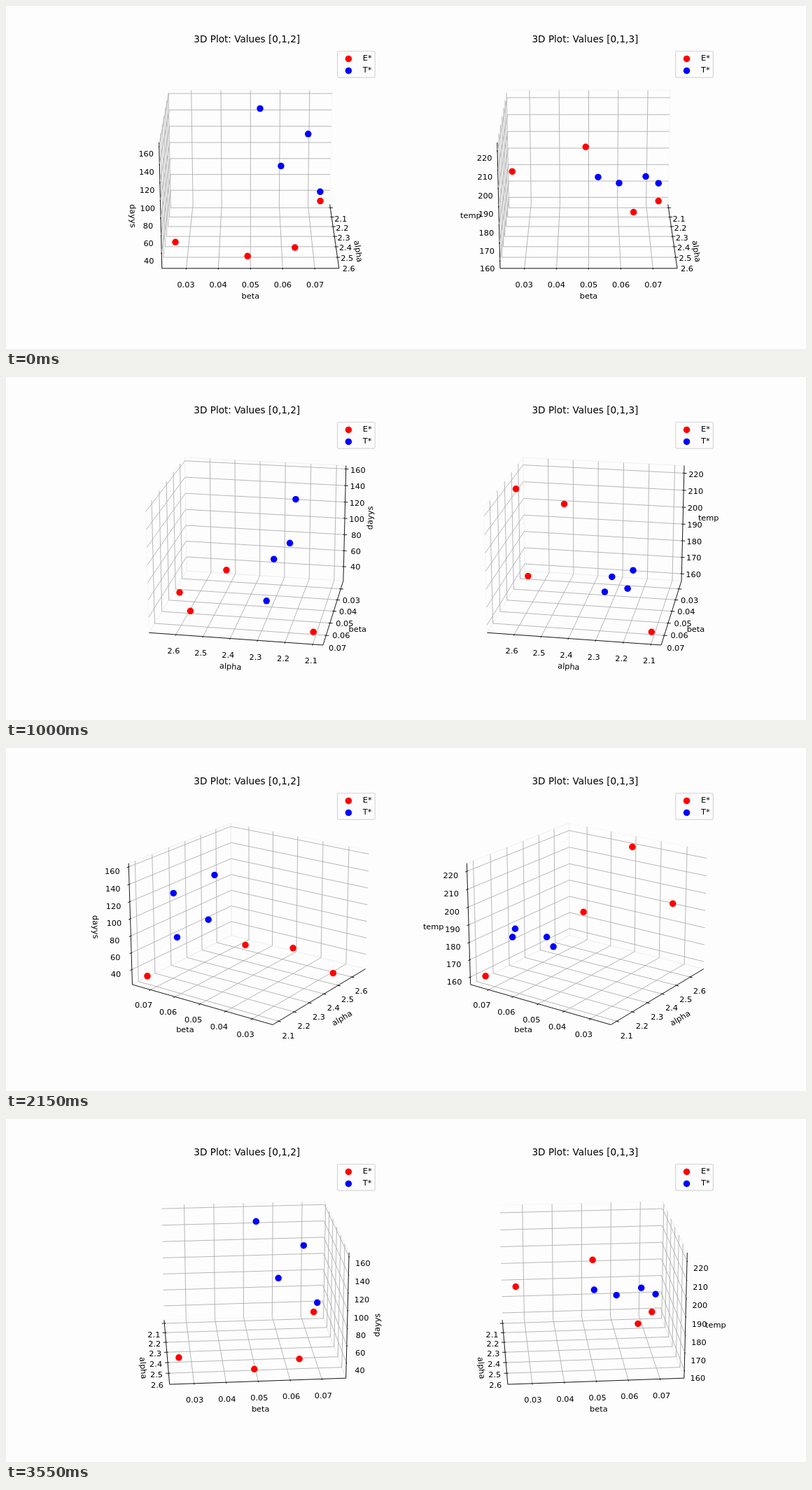
These frames come from a looping animation (1143x490 px, 3.6 s). An HTML page with a canvas:

```html
<!DOCTYPE html>
<html lang="en">
<head>
<meta charset="utf-8">
<title>Rotating 3D scatter plots</title>
<style>
  html, body { margin: 0; width: 100%; height: 100%; overflow: hidden; background: #fdfdfd; }
  canvas { display: block; width: 1143px; height: 490px; }
</style>
</head>
<body>
<canvas id="stage" width="1143" height="490"></canvas>
<script>
const ctx = document.getElementById('stage').getContext('2d');

const STEP_MS = 50, STEPS = 72, STEP_DEG = 360 / STEPS;
const ELEV = 20 * Math.PI / 180, DIST = 10;
const PT = 81.65 / 72;              // pixels per point
const FONT = 10 * PT;
const SIDE = 377.3, TOP = 58.8;     // square drawing area of each plot
const SCALE = SIDE / 0.185;
const SHIFT = SIDE * 0.0025 / 0.185;
const BOX = [8 / 7, 8 / 7, 6 / 7];  // box size in view units
const DELTA = 1 / 12;
const EDGE = 0.5 + DELTA / 4;
const PER_POINT = 48 / (2 * SIDE / PT) * DELTA;
const LABEL_GAP = 25 * PER_POINT, TICK_GAP = 11.5 * PER_POINT;
const PANE = ['rgba(242,242,242,.5)', 'rgba(229,229,229,.5)', 'rgba(236,236,236,.5)'];

const series = [
  { name: 'E*', color: '#f00', rows: [   // alpha, beta, dayys, temp
    [2.5287, 0.02593, 31, 200],
    [2.6601, 0.0491, 31, 220],
    [2.58, 0.06413, 31, 180],
    [2.1039, 0.07407, 31, 160]] },
  { name: 'T*', color: '#00f', rows: [
    [2.2075, 0.05317, 155, 180],
    [2.2005, 0.0692, 124, 180],
    [2.2744, 0.0601, 93, 180],
    [2.2763, 0.0732, 62, 180]] }
];

const axis = (label, lo, hi, first, step, count, digits) => ({
  label, lo, hi, digits,
  ticks: Array.from({ length: count }, (_, i) => first + i * step)
});
const alpha = axis('alpha', 2.0761, 2.6879, 2.1, 0.1, 6, 1);
const beta = axis('beta', 0.02352, 0.07648, 0.03, 0.01, 5, 2);
const plots = [
  { mid: 344.2, title: '3D Plot: Values [0,1,2]', column: 2,
    axes: [alpha, beta, axis('dayys', 24.8, 161.2, 40, 20, 7, 0)] },
  { mid: 827.4, title: '3D Plot: Values [0,1,3]', column: 3,
    axes: [alpha, beta, axis('temp', 157, 223, 160, 10, 7, 0)] }
];

const unit = (ax, v) => (v - ax.lo) / (ax.hi - ax.lo) - 0.5;
const put = (p, i, v) => p.map((old, k) => k === i ? v : old);
const pushOut = (p, skip, d) => p.map((v, k) => k === skip ? v : v + (v < 0 ? -d : d));

function projector(mid, azim) {
  const ca = Math.cos(azim), sa = Math.sin(azim);
  const ce = Math.cos(ELEV), se = Math.sin(ELEV);
  return p => {
    const [x, y, z] = p.map((v, i) => v * BOX[i]);
    const near = x * ca + y * sa;
    const k = SCALE / (DIST - near * ce - z * se);
    return [mid + SHIFT + (y * ca - x * sa) * k,
            TOP + SIDE / 2 - SHIFT - (z * ce - near * se) * k];
  };
}

function polyline(points, color, width) {
  ctx.beginPath();
  points.forEach(([x, y]) => ctx.lineTo(x, y));
  ctx.strokeStyle = color;
  ctx.lineWidth = width * PT;
  ctx.stroke();
}

function text(str, x, y, align = 'center', size = FONT) {
  ctx.font = `${size}px "DejaVu Sans", sans-serif`;
  ctx.textAlign = align;
  ctx.fillStyle = '#000';
  ctx.fillText(str, x, y);
}

function dot(x, y, color) {
  ctx.beginPath();
  ctx.arc(x, y, 4.75, 0, 2 * Math.PI);
  ctx.fillStyle = color;
  ctx.fill();
}

function drawPane(i, far, proj) {
  const [a, b] = [[1, 2], [0, 2], [0, 1]][i];
  const corners = [[-EDGE, -EDGE], [EDGE, -EDGE], [EDGE, EDGE], [-EDGE, EDGE]];
  polyline(corners.map(([u, v]) => proj(put(put(far, a, u), b, v))), PANE[i], 1);
}

function drawAxis(ax, i, far, proj) {
  const side = i === 0 ? 1 : 0;     // direction of the tick marks
  const start = put(far, side, -far[side]);
  const end = put(start, i, -start[i]);
  const [p, q] = [proj(start), proj(end)];
  polyline([p, q], '#000', 0.8);

  // long labels follow their axis, short ones stay level
  const [lx, ly] = proj(pushOut(put(start, i, 0), i, LABEL_GAP));
  ctx.save();
  ctx.translate(lx, ly);
  if (ax.label.length > 4) {
    let angle = Math.atan2(p[1] - q[1], q[0] - p[0]);
    if (angle < 0) angle += Math.PI;
    if (angle > Math.PI / 2) angle -= Math.PI;
    ctx.rotate(-angle);
  }
  text(ax.label, 0, 3.3);
  ctx.restore();

  const at = ax.ticks.map(v => unit(ax, v));
  const [a, b] = [(i + 1) % 3, (i + 2) % 3];
  for (const v of at) {
    const corner = put(far, i, v);
    polyline([put(corner, a, -far[a]), corner, put(corner, b, -far[b])].map(proj), '#b0b0b0', 0.8);
  }
  const sign = Math.sign(far[side]);
  at.forEach((v, k) => {
    const pos = put(start, i, v);
    const mark = d => proj(put(pos, side, pos[side] + d * sign * DELTA));
    polyline([mark(0.1), mark(-0.2)], '#000', 0.8);
    const [x, y] = proj(pushOut(pos, i, TICK_GAP));
    text(ax.ticks[k].toFixed(ax.digits), x, y + 8.9);
  });
}

function drawLegend(mid) {
  const right = mid + SIDE / 2 - FONT / 2, left = right - 53.7;
  ctx.beginPath();
  ctx.roundRect(left, TOP + FONT / 2, right - left, 37.6, 0.2 * FONT);
  ctx.fillStyle = 'rgba(253,253,253,.8)';
  ctx.fill();
  ctx.strokeStyle = 'rgba(204,204,204,.8)';
  ctx.lineWidth = PT;
  ctx.stroke();
  series.forEach((s, i) => {
    const base = 78.4 + 17 * i;
    dot(left + 1.4 * FONT, base - 3, s.color);
    text(s.name, left + 3.2 * FONT, base, 'left');
  });
}

function drawPlot(plot, azim) {
  const proj = projector(plot.mid, azim);
  const far = [Math.cos(azim) < 0 ? EDGE : -EDGE, Math.sin(azim) < 0 ? EDGE : -EDGE, -EDGE];
  plot.axes.forEach((_, i) => drawPane(i, far, proj));
  plot.axes.forEach((ax, i) => drawAxis(ax, i, far, proj));
  for (const s of series) {
    for (const row of s.rows) {
      const values = [row[0], row[1], row[plot.column]];
      dot(...proj(values.map((v, i) => unit(plot.axes[i], v))), s.color);
    }
  }
  text(plot.title, plot.mid, TOP - 6 * PT, 'center', 12 * PT);
  drawLegend(plot.mid);
}

let shown = -1;
const begin = performance.now();
function tick(now) {
  const step = Math.floor(Math.max(0, now - begin) / STEP_MS) % STEPS;
  if (step !== shown) {
    shown = step;
    ctx.fillStyle = '#fdfdfd';
    ctx.fillRect(0, 0, 1143, 490);
    plots.forEach(plot => drawPlot(plot, step * STEP_DEG * Math.PI / 180));
  }
  requestAnimationFrame(tick);
}
tick(begin);
</script>
</body>
</html>
```
